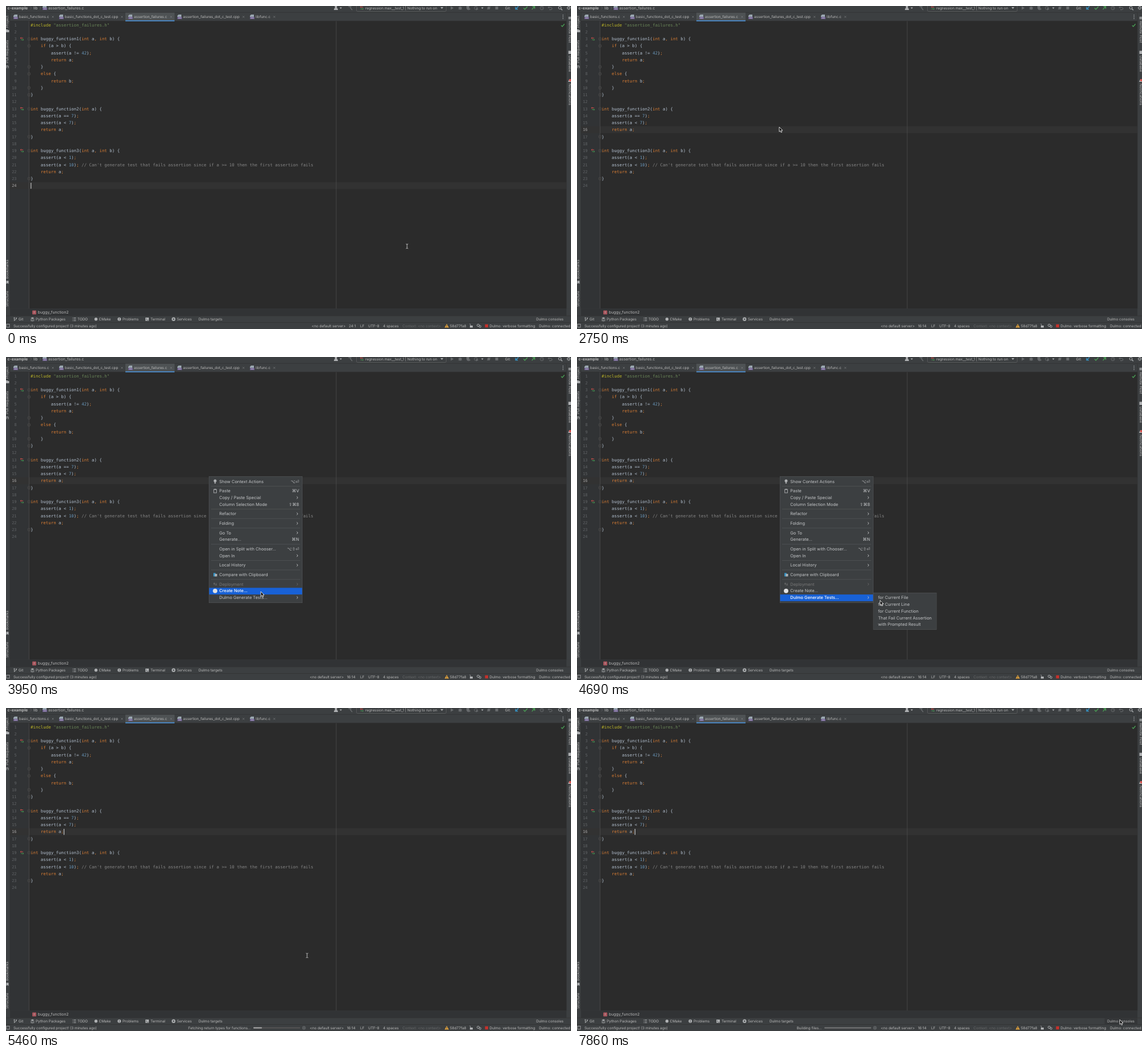
Write an HTML page that moves like this. It is 989 by 566 pixels and loops after 8000 ms.

```html
<!DOCTYPE html>
<html lang="en">
<head>
<meta charset="utf-8">
<title>Editor test generation</title>
<style>
html, body { margin: 0; width: 100%; height: 100%; overflow: hidden; background: #3c3f41; }
svg { display: block; width: 989px; height: 566px; }
text { font-family: Inter, "Open Sans", sans-serif; fill: #bbb; white-space: pre; text-rendering: geometricPrecision; }
.code { font-family: "DejaVu Sans Mono", "Noto Sans Mono", monospace; fill: #b3c0cf; }
.keys { font-family: "DejaVu Sans", sans-serif; fill: #c4c6c8; }
</style>
</head>
<body>
<svg id="stage" viewBox="0 0 989 566" xmlns="http://www.w3.org/2000/svg"></svg>
<script>
const LOOP = 8000, SMALL = 6.35, MID = 6.85, MENU = 7.45, CODE = 7.41, CELL = 4.46;
const PANEL = '#3c3f41', GREY = '#afb1b3', DIM = '#686b6d', BLUE = '#3592c4', GREEN = '#499c54', RED = '#d8544f';
const TOOL = 'Dulmo';

const esc = s => s.replace(/&/g, '&amp;').replace(/</g, '&lt;').replace(/>/g, '&gt;');
const rect = (x, y, w, h, fill, more = '') => `<rect x="${x}" y="${y}" width="${w}" height="${h}" fill="${fill}" ${more}/>`;
const dot = (x, y, r, fill) => `<circle cx="${x}" cy="${y}" r="${r}" fill="${fill}"/>`;
const ring = (x, y, r, color) => `<circle cx="${x}" cy="${y}" r="${r}" fill="none" stroke="${color}"/>`;
const line = (d, color = GREY, w = 1) => `<path d="${d}" fill="none" stroke="${color}" stroke-width="${w}"/>`;
const shape = (d, color = GREY, more = '') => `<path d="${d}" fill="${color}" ${more}/>`;
const group = (id, body) => `<g id="${id}">${body}</g>`;
// y is the vertical middle of the text
const label = (x, y, s, size = SMALL, more = '') =>
  `<text x="${x}" y="${(y + size * 0.36).toFixed(2)}" font-size="${size}" ${more}>${esc(s)}</text>`;
const fill = c => `style="fill:${c}"`;

const source = `#include "assertion_failures.h"

int buggy_function1(int a, int b) {
    if (a > b) {
        assert(a != 42);
        return a;
    }
    else {
        return b;
    }
}

int buggy_function2(int a) {
    assert(a == 7);
    assert(a < 7);
    return a;
}

int buggy_function3(int a, int b) {
    assert(a < 1);
    assert(a < 10); // Can't generate test that fails assertion since if a >= 10 then the first assertion fails
    return a;
}
`.split('\n');
const rowY = n => 33.2 + 12.24 * (n - 1);

const tokens = [
  [/^\/\/.*/, '#858585'], [/^#\w+/, '#bbb529'], [/^"[^"]*"/, '#6a8759'],
  [/^(int|if|else|return)\b/, '#d87d34'], [/^[;,]/, '#cc7832'], [/^\d+/, '#6897bb'], [/^(\w+|\s+|.)/, '']
];
function highlight(text) {
  let out = '';
  while (text) {
    const [pattern, color] = tokens.find(([p]) => p.test(text));
    const word = text.match(pattern)[0];
    out += color ? `<tspan fill="${color}">${esc(word)}</tspan>` : esc(word);
    text = text.slice(word.length);
  }
  return out;
}

function fileIcon(x, y) {
  return shape(`M${x + 2} ${y - 4}h5v4h-7v-2z`, '#9aa7b0') + rect(x, y, 8, 4, '#6d5f8d') + line(`M${x + 1.5} ${y + 2}h5`, '#d5cfe2', 0.8);
}
const cross = (x, y) => line(`M${x - 1.5} ${y - 1.5}l3 3m0 -3l-3 3`, '#7c7f81', 0.7);

function editor() {
  let out = rect(7, 26, 974, 504.5, '#2b2b2b') + rect(7, 26, 33, 504.5, '#313335');
  out += group('caretRow', rect(7, -6, 974, 12, '#323232'));
  out += line('M40.3 26V530.5', '#555', 0.7) + line('M578 26V530.5', '#4b4b4b', 0.9);
  source.forEach((text, i) => {
    const n = i + 1, y = rowY(n);
    out += label(18.6, y, String(n), 7, `id="num${n}" class="code" text-anchor="end" ${fill('#606366')}`);
    out += `<text class="code" x="43" y="${(y + 2.5).toFixed(2)}" font-size="${CODE}">${highlight(text)}</text>`;
    if (/[{}]$/.test(text))
      out += rect(38.3, y - 2, 4, 4, '#2b2b2b', 'stroke="#606060" stroke-width=".6" rx=".7"') + line(`M39.2 ${y}h2.2`, '#707070', 0.6);
    if (/^int/.test(text))
      out += line(`M30 ${y - 1.5}h-4.8l1.5 -1.5m-1.5 1.5l1.5 1.3`, RED, 0.9) + line(`M26 ${y + 1.5}h4.8l-1.5 1.5m1.5 -1.5l-1.5 -1.3`, GREEN, 0.9);
  });
  return out + line('M971.8 34l2 2l3.7 -4.5', GREEN, 1.4);
}

function topBar() {
  let out = rect(0, 0, 989, 26, PANEL) + line('M0 11.3H989M0 26.4H989', '#323232', 0.7);
  out += label(2.5, 3.5, 'c-example', MID, 'font-weight="700"') + label(48, 3.5, 'lib', MID);
  out += line('M42.5 1l2 2.5l-2 2.5M59 1l2 2.5l-2 2.5', DIM, 0.6) + fileIcon(64, 3) + label(74, 3.5, 'assertion_failures.c', MID);
  out += dot(577.5, 1.5, 2, GREY) + shape('M574 7q0 -4 3.5 -4t3.5 4z') + shape('M584 2.5h4l-2 2.5z');
  out += line('M599.5 1.5l3 -1.5l2 2M602 2l4 5', DIM, 1.4);
  out += rect(613.5, -4, 157, 13.5, PANEL, 'stroke="#5e6060" stroke-width=".8" rx="2"');
  out += line('M625 2h-5l1.5 -1.4', RED) + line('M620.5 5h5l-1.5 1.4', GREEN);
  out += label(629, 3.5, 'regression.max__test_1 | Nothing to run on') + shape('M760.5 2h5l-2.5 3z');
  out += shape('M778.5 .5l5 3l-5 3z', DIM) + dot(795, 3.8, 2.7, DIM) + line('M791.5 2l7 4m0 -4l-7 4', DIM, 0.6);
  out += shape('M806 0h5v4l-2 3q-3 -1 -3 -4z', DIM) + shape('M809.5 3l4 2.2l-4 2.2z', DIM);
  out += ring(822.5, 3.5, 2.7, DIM) + shape('M823 3l4 2.2l-4 2.2z', DIM) + shape('M831.8 2.5h4l-2 2.5z');
  out += dot(845, 3.5, 2.5, DIM) + line('M842 6l6 -5', DIM) + rect(856.5, 1, 5, 5, DIM);
  out += label(873.5, 3.5, 'Git:') + line('M897 .5l-5 5m0 -4v4h4', BLUE, 1.3) + line('M906 3.5l2.2 2.5l4.5 -5', GREEN, 1.4);
  out += line('M920.5 6l5 -5m-4 0h4v4', GREEN, 1.3) + ring(938, 3.5, 3, DIM) + line('M938 1.5v2.2h1.7', DIM, 0.7);
  out += line('M951 .5l-2 2l2 2m-2 -2h4q3 0 3 2t-3 2h-2', DIM) + ring(969.5, 3, 2.4, GREY) + line('M971.3 4.8l2.5 2.5', GREY, 1.3);
  out += ring(985, 3.3, 2, GREY) + `<circle cx="985" cy="3.3" r="3" fill="none" stroke="${GREY}" stroke-dasharray="1.2 1.15"/>`;
  out += rect(209, 11.7, 86, 15, '#4e5254') + rect(209, 25, 86, 1.8, '#4a88c7');
  [[13, 'basic_functions.c', 82], [93, 'basic_functions_dot_c_test.cpp', 203], [214, 'assertion_failures.c', 289],
    [300, 'assertion_failures_dot_c_test.cpp', 415.7], [427, 'libfunc.c', 469.6]].forEach(([x, name, close]) => {
    out += fileIcon(x, 19) + label(x + 10, 19, name) + cross(close, 19);
  });
  return out + [16, 19, 22].map(y => dot(975, y, 0.8, GREY)).join('');
}

function sideBars() {
  let out = rect(0, 11.5, 7, 532, PANEL) + rect(981, 11.5, 8, 532, PANEL) + line('M7 11.5V543M981 11.5V543', '#323232', 0.6);
  const turned = (x, y, s, angle) => `<text transform="translate(${x} ${y}) rotate(${angle})" font-size="${SMALL}">${s}</text>`;
  [[38, 'Project'], [100, 'Pull Requests'], [478, 'Bookmarks'], [527, 'Structure']].forEach(([y, s]) => out += turned(4.4, y, s, -90));
  [[26, 'Remote Host'], [87, 'Database'], [136, 'Notifications']].forEach(([y, s]) => out += turned(984.7, y, s, 90));
  out += shape('M0 41h2.5l1 1h2v4h-5.5z') + line('M1 104v5M4 109v-4h-3', GREY, 0.9) + shape('M.5 481.5h4v5.5l-2 -1.6l-2 1.6z');
  out += rect(0, 531, 2, 2, GREY) + rect(3, 533.5, 2, 2, GREY) + rect(0, 533.5, 2, 2, GREY);
  out += rect(984.5, 19, 4.5, 1.6, GREY) + rect(984.5, 21.5, 4.5, 1.6, GREY) + rect(984.5, 78.5, 4.5, 5.5, GREY);
  return out + shape('M984 133q1.5 -5 3 -5t3 5z') + dot(987.5, 130, 2, RED);
}

function bottomBars() {
  let out = rect(0, 530.5, 989, 36, PANEL) + rect(7, 530.5, 974, 12.5, '#313335') + line('M0 543H989M0 554.6H989', '#323232', 0.7);
  out += group('crumb', rect(46, 533.5, 7, 7, '#a9545c', 'rx="1"') + label(48.5, 537, 'f', 5.5) + label(55.8, 537, 'buggy_function2', MID));
  out += group('hover', rect(923.5, 543.4, 57.5, 10.9, '#343638'));
  [[22, 'Git'], [52, 'Python Packages'], [125, 'TODO'], [162.5, 'CMake'], [204, 'Problems'], [253, 'Terminal'], [299, 'Services'],
    [337, TOOL + ' targets'], [928, TOOL + ' consoles']].forEach(([x, s]) => out += label(x, 548.8, s));
  out += line('M14.5 546v6M14.5 550.5q3.5 0 3.5 -3', GREY, 0.9) + dot(14.5, 546.5, 1, GREY) + dot(18, 547, 1, GREY);
  out += shape('M43 547l3.3 -1.5l3.3 1.5l-3.3 1.5z') + line('M43 549l3.3 1.5l3.3 -1.5M43 551l3.3 1.3l3.3 -1.3', GREY, 0.8);
  out += line('M116.5 546.5h1m1 0h4M116.5 549h1m1 0h4M116.5 551.5h1m1 0h4', GREY, 0.9);
  out += dot(157.5, 548.8, 2.7, GREY) + dot(198.3, 548.8, 3, GREY) + line('M198.3 546.8v2.5m0 .7v1', PANEL, 0.9);
  out += rect(244, 546, 6, 5.7, GREY) + line('M245 547.3l1.5 1.4l-1.5 1.4M247.3 550.5h2', PANEL, 0.7);
  out += dot(293.3, 548.8, 3.2, GREY) + shape('M292.4 547l2.7 1.8l-2.7 1.8z', PANEL);
  out += rect(1, 557.5, 5, 5.5, 'none', `stroke="${GREY}" stroke-width=".8"`);
  out += label(13, 560.5, 'Successfully configured project! (3 minutes ago)');
  out += group('place', label(0, 560.5, '<no default server>') + label(65, 560.5, '', SMALL, 'id="position"'));
  [[620, 'LF'], [634, 'UTF-8'], [660, '4 spaces'], [777, '58d77fa8'], [846.3, TOOL + ': verbose formatting'],
    [933, TOOL + ': connected']].forEach(([x, s]) => out += label(x, 560.5, s));
  out += label(694, 560.5, 'Context: <no context>', SMALL, fill('#67696a'));
  out += shape('M771.5 557l3.7 6.5h-7.4z', '#e3a33b') + line('M771.5 559v2.3m0 .6v.8', '#3c3f41', 0.8);
  out += rect(812, 560, 5, 3.5, GREY) + line('M813 560v-1.5q0 -1.5 -1.5 -1.5', GREY, 0.8);
  out += ring(826.5, 559.5, 2, GREY) + ring(829.8, 561.5, 1.7, GREY) + rect(838.5, 557.8, 5.4, 5.4, '#c4312b');
  out += group('progress', label(428.5, 560.5, '', SMALL, 'id="task" text-anchor="end"') + rect(433, 559.6, 82, 1.8, '#555', 'rx=".9"')
    + rect(433, 559.6, 0, 1.8, '#aaa', 'id="bar" rx=".9"') + ring(521.5, 560.5, 2.6, '#6e7173') + cross(521.5, 560.5));
  return out;
}

// name, shortcut ('>' opens a submenu); '-' is a separator
const menuItems = [['Show Context Actions', '⌥⏎'], '-', ['Paste', '⌘V'], ['Copy / Paste Special', '>'], ['Column Selection Mode', '⇧⌘8'], '-',
  ['Refactor', '>'], '-', ['Folding', '>'], '-', ['Go To', '>'], ['Generate...', '⌘N'], '-', ['Open in Split with Chooser...', '⌥⇧⏎'],
  ['Open In', '>'], '-', ['Local History', '>'], '-', ['Compare with Clipboard', ''], '-', ['Deployment', '>'], ['Create Note...', ''],
  [TOOL + ' Generate Tests...', '>']];
const subItems = ['for Current File', 'for Current Line', 'for Current Function', 'That Fail Current Assertion', 'with Prompted Result'];
const menuRows = [], ROW = 11.7, SELECT = '#1861d6';
const popup = (x, y, w, h) => rect(x, y, w, h, '#515355') + rect(x + 0.6, y + 0.6, w - 1.2, h - 1.2, PANEL);

function contextMenu() {
  let y = 218.1, rows = '';
  for (const item of menuItems) {
    if (item === '-') {
      rows += line(`M359 ${y - 3.4}H515`, '#55585a', 0.7);
      y += 4.95;
      continue;
    }
    const [name, key] = item, off = name === 'Deployment', ink = off ? '#777' : '#c4c6c8';
    menuRows.push({ y, off });
    rows += label(373.3, y, name, MENU, `class="item" ${fill(ink)}`);
    rows += key === '>' ? line(`M508.8 ${y - 2}l2.2 2l-2.2 2`, off ? '#666' : ink, 0.9)
      : label(513, y, key, 7.4, 'class="keys" text-anchor="end"');
    y += ROW;
  }
  const icons = dot(366, 217, 2.5, GREY) + rect(364.8, 219.5, 2.4, 2.2, GREY)
    + rect(363.7, 232, 4.8, 6, 'none', `stroke="${GREY}" stroke-width=".9"`) + rect(364.8, 231, 2.6, 1.6, GREY)
    + rect(363, 378.5, 4, 6, BLUE) + rect(365.5, 380, 4, 4.5, GREY) + line('M363 397h3m-1.5 -1.5v4M369 399.5h-3m1.8 -3.5v4', '#777', 0.8)
    + dot(366, 409.8, 3.9, '#e2e3e4');
  return popup(355, 209, 164, 222) + group('menuPick', rect(355.6, 0.5 - ROW / 2, 162.8, ROW, SELECT)) + rows + icons;
}

function subMenu() {
  return popup(518.5, 413, 111, 65) + group('subPick', rect(519.1, 0.3 - ROW / 2, 109.8, ROW, SELECT))
    + subItems.map((s, i) => label(527, 421.8 + i * ROW, s, MENU, fill('#c4c6c8'))).join('');
}

const beam = 'M-1.9 -4q1.5 0 1.9 1q.4 -1 1.9 -1M0 -3V3M-1.9 4q1.5 0 1.9 -1q.4 1 1.9 1';
const stage = document.getElementById('stage');
stage.innerHTML = editor() + topBar() + sideBars() + bottomBars()
  + group('caret', rect(0, -5, 1.1, 10.5, '#d0d0d0'))
  + group('menu', contextMenu()) + group('sub', subMenu())
  + group('mouse', group('beam', line(beam, '#222', 1.6) + line(beam, '#eee', 0.8))
    + group('arrow', shape('M0 0V8.3L1.9 6.6L3.2 9.6L4.7 9L3.4 6H6z', '#111', 'stroke="#fff" stroke-width=".8"')));

const el = Object.fromEntries([...stage.querySelectorAll('[id]')].map(e => [e.id, e]));
const items = [...stage.querySelectorAll('.item')];
const show = (e, on) => e.setAttribute('visibility', on ? 'inherit' : 'hidden');
const move = (e, x, y) => e.setAttribute('transform', `translate(${x.toFixed(2)} ${y.toFixed(2)})`);
const within = (t, ...spans) => spans.some(([a, b]) => t >= a && t < b);

// start, end, steps, x, y: the pointer jumps there in even steps
const moves = [[510, 960, 4, 482, 332], [1410, 2000, 5, 354, 212], [2900, 3500, 5, 411, 430], [3800, 3950, 2, 446, 411],
  [4100, 4690, 5, 530.5, 426.5], [4840, 4841, 1, 534, 430], [4980, 4981, 1, 537, 422], [5280, 5281, 1, 538.5, 424.5],
  [5460, 6180, 5, 481, 470.5], [6570, 6960, 3, 932, 552], [7410, 7860, 3, 950, 546]];
function pointer(t) {
  let x = 702, y = 421;
  for (const [from, to, steps, tx, ty] of moves) {
    if (t < from) break;
    const done = Math.min(steps, 1 + Math.floor((t - from) / ((to - from) / (steps - 1)))) / steps;
    x += (tx - x) * done;
    y += (ty - y) * done;
  }
  return [x, y];
}

function render(t) {
  const [x, y] = pointer(t), arrow = within(t, [2750, 5280], [7410, LOOP]);
  move(el.mouse, x, y);
  show(el.arrow, arrow);
  show(el.beam, !arrow);

  const moved = t >= 1860, row = moved ? 16 : 24;
  move(el.caretRow, 0, rowY(row));
  move(el.caret, moved ? 43 + 13 * CELL : 43.2, rowY(row));
  show(el.caret, within(t, [0, 510], [960, 1410], [1860, 2450], [5460, 5820], [6390, 6960], [7410, LOOP]));
  for (const n of [16, 24]) el['num' + n].style.fill = n === row ? '#a4a3a3' : '#606366';
  show(el.crumb, t < 180 || moved);
  move(el.place, moved ? 531.7 : 535, 0);
  el.position.textContent = moved ? '16:14' : '24:1';

  const last = menuRows.length - 1;
  const near = x > 519 || y > menuRows[last].y ? last : menuRows.findIndex(r => !r.off && Math.abs(r.y - y) < ROW / 2);
  show(el.menu, within(t, [2900, 5460]));
  show(el.menuPick, near >= 0);
  if (near >= 0) move(el.menuPick, 0, menuRows[near].y);
  items.forEach((e, i) => {
    e.style.fill = i === near ? '#fff' : menuRows[i].off ? '#777' : '#c4c6c8';
    e.style.fontWeight = i === near ? 500 : 400;
  });
  // a hidden parent must also hide the highlight inside it
  show(el.sub, within(t, [3650, 3950], [4250, 5280]));
  show(el.subPick, t >= 4840);
  move(el.subPick, 0, t < 4980 ? 421.8 + ROW : 421.8);

  const building = t >= 7410;
  show(el.progress, t >= 5460);
  el.task.textContent = building ? 'Building files...' : 'Fetching return types for functions...';
  const tick = Math.floor((t - 5460) / 186);
  el.bar.setAttribute('width', building ? 82 : Math.max(0, Math.min(82, 15 + tick * 10)));
  el.bar.setAttribute('fill', building ? '#707273' : '#aaa');
  show(el.hover, t >= 7560);
}

const start = performance.now();
function frame(now) {
  render(Math.max(0, now - start) % LOOP);
  requestAnimationFrame(frame);
}
render(0);
requestAnimationFrame(frame);
</script>
</body>
</html>
```
